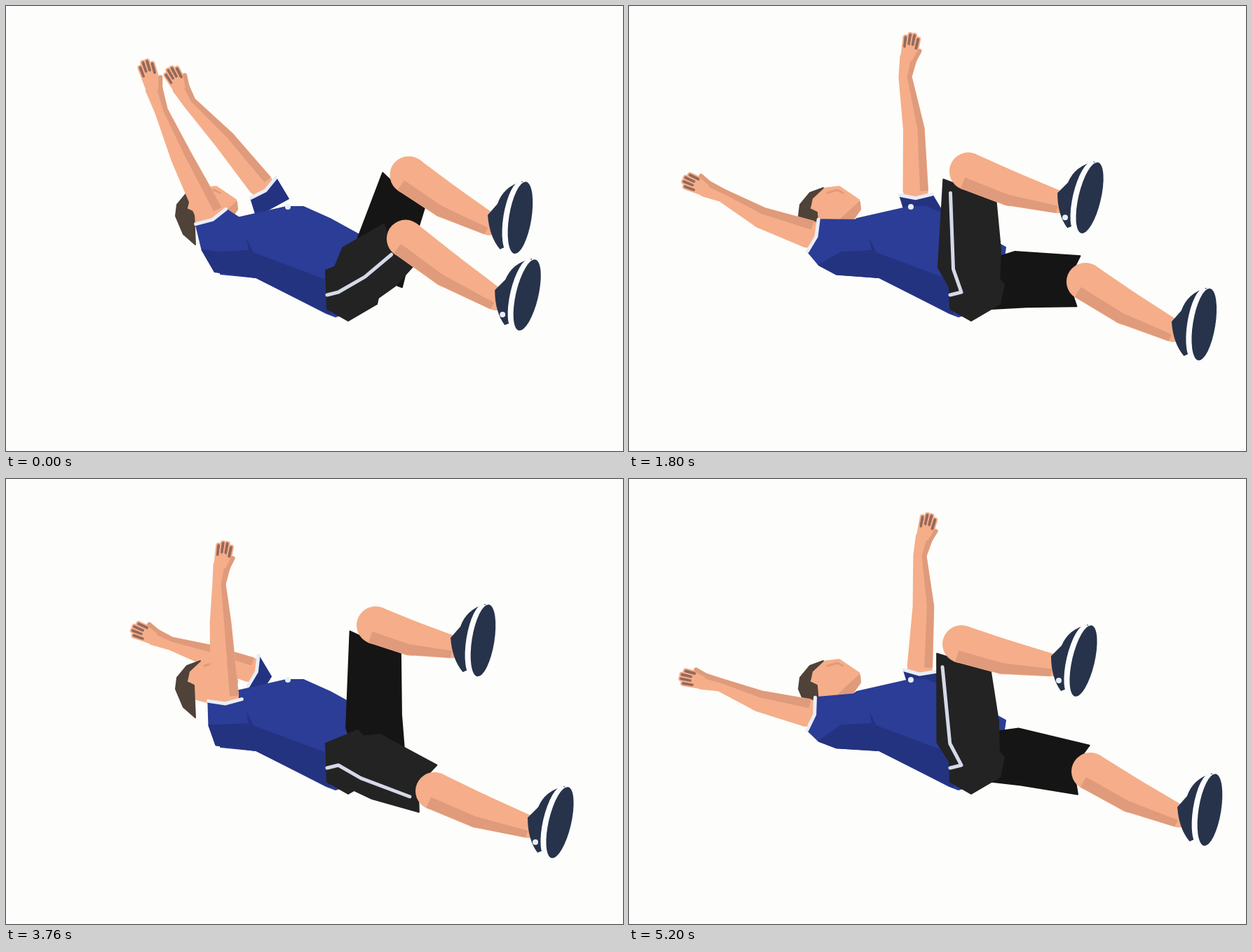
Recreate the animation shown at these times as an HTML page with a canvas. Size 880 px wide and 636 px high, loop 5.22 s.

```html
<!DOCTYPE html>
<html lang="en">
<head>
<meta charset="utf-8">
<title>Floor exercise</title>
<style>
html, body { margin: 0; width: 100%; height: 100%; overflow: hidden; background: #fdfdfb; }
canvas { display: block; width: 880px; height: 636px; }
</style>
</head>
<body>
<canvas id="stage" width="880" height="636"></canvas>
<script>
const ctx = document.getElementById('stage').getContext('2d');
const LOOP = 5220, CYCLE = 66, REACH = 46.75;
const PAPER = '#fdfdfb', SKIN = '#f5ae89', SKIN_SHADE = '#df9b7b', FINGER = '#94695c';
const SHIRT = '#2b3d96', SHIRT_DARK = '#243380', SHORTS = '#232323', FAR_SHORTS = '#151515';
const SHOE = '#27334a', TRIM = '#e9edf6', HAIR = '#4f4239';

const mix = (a, b, k) => a.map((v, i) => v + (b[i] - v) * k);
const add = ([x, y], dx, dy) => [x + dx, y + dy];

// Each joint swings along an arc: first pose, control point, last pose
const swing = (a, c, b) => p => mix(mix(a, c, p), mix(c, b, p), p);

const nearArm = [
  swing([254, 334], [273, 271], [312, 310]),
  swing([185, 317], [204, 204], [306, 205]),
  swing([130, 294], [153, 118], [304, 150]),
  swing([73, 282], [100, 17], [313, 90])];
const farArm = [
  swing([415, 268], [369, 234], [347, 272]),
  swing([420, 182], [318, 131], [285, 251]),
  swing([415, 110], [257, 40], [235, 235]),
  swing([429, 50], [246, -38], [180, 213])];
const nearLeg = [
  swing([474, 236], [547, 231], [611, 446]),
  swing([603, 266], [669, 369], [745, 497])];
const farLeg = [
  swing([658, 418], [607, 237], [527, 209]),
  swing([784, 482], [725, 351], [636, 240])];
const NEAR_HIP = [490, 400], FAR_HIP = [520, 385];

const TORSO = [[300, 322], [325, 304], [400, 287], [424, 287], [462, 304], [502, 326], [537, 345],
  [525, 425], [470, 444], [457, 439], [357, 388], [306, 383]];
const TORSO_SHADE = [[340, 328], [352, 353], [459, 393], [462, 440], [357, 388]];
const SEAT = [[456, 378], [502, 359], [535, 398], [529, 426], [488, 450], [458, 433]];
const FACE = [[256, 270], [275, 261], [300, 258], [328, 277], [330, 290], [318, 308],
  [306, 324], [268, 314]];
const JAW = [[329, 280], [330, 291], [306, 324], [288, 320], [305, 302]];
const HAIR_TOP = [[242, 300], [244, 284], [258, 267], [277, 260], [261, 275], [258, 290], [268, 295]];

function path(pts) {
  ctx.beginPath();
  pts.forEach(p => ctx.lineTo(p[0], p[1]));
}

function fill(pts, color) {
  path(pts);
  ctx.closePath();
  ctx.fillStyle = ctx.strokeStyle = color;
  ctx.lineWidth = 2;
  ctx.fill();
  ctx.stroke();
}

function line(pts, color, width) {
  path(pts);
  ctx.strokeStyle = color;
  ctx.lineWidth = width;
  ctx.stroke();
}

function oval(x, y, rx, ry, turn, color) {
  ctx.beginPath();
  ctx.ellipse(x, y, rx, ry, turn, 0, Math.PI * 2);
  ctx.fillStyle = color;
  ctx.fill();
}

const dot = (x, y, r, color) => oval(x, y, r, r, 0, color);

// Local axes of a bone: at(along, across) measured in pixels from its start
function bone(from, to) {
  const dx = to[0] - from[0], dy = to[1] - from[1], length = Math.hypot(dx, dy);
  const ux = dx / length, uy = dy / length;
  return { length, at: (s, w) => [from[0] + ux * s - uy * w, from[1] + uy * s + ux * w] };
}

function limb(joints, widths) {
  const last = joints.length - 1;
  const side = k => joints.map((p, i) => {
    const b = bone(joints[Math.max(i - 1, 0)], joints[Math.min(i + 1, last)]);
    const [x, y] = b.at(0, widths[i] * k), [ox, oy] = joints[Math.max(i - 1, 0)];
    return add(p, x - ox, y - oy);
  });
  joints.forEach((p, i) => dot(...p, widths[i], SKIN));
  fill([...side(-0.96), ...side(0.96).reverse()], SKIN);
  fill([...side(0.4), ...side(0.93).reverse()], SKIN_SHADE);
}

function arm(joints, upper) {
  const [shoulder, elbow, wrist, tip] = joints;
  const palm = mix(wrist, tip, 0.45);
  limb([shoulder, elbow, wrist, palm], [upper, 15, 9, 12]);
  const { at, length } = bone(palm, tip);
  for (let f = -1.5; f <= 1.5; f++) {
    const end = length * (1 - Math.abs(f) * 0.13);
    line([at(0, f * 5), at(end, f * 6)], SKIN, 8);
    line([at(end - 13, f * 5.5), at(end, f * 6)], FINGER, 4);
  }
  line([at(-3, 9), at(12, 14)], SKIN_SHADE, 6);
}

// The cuff sits square to the upper arm
function cuff(joints, half) {
  const { at } = bone(joints[0], joints[1]);
  return [at(-6, -half), at(-11, 0), at(-6, half)];
}

function thigh(hip, knee, halves, color) {
  const b = bone(hip, knee), hem = b.length - 10;
  const [top, under, seat] = halves;
  fill([b.at(0, -top * 0.7), b.at(28, -top), b.at(hem, -36), b.at(hem - 15, 0), b.at(hem, 36),
    b.at(50, under), b.at(0, seat)], color);
  return b;
}

function shin([knee, ankle]) {
  const b = bone(knee, ankle);
  limb([knee, b.at(b.length * 0.48, 4), ankle], [27, 25, 16]);
}

function shoe([x, y], turn) {
  ctx.save();
  ctx.translate(x, y);
  ctx.rotate(turn);
  ctx.beginPath();
  ctx.moveTo(52, -58);
  ctx.quadraticCurveTo(24, -52, 14, -28);
  ctx.lineTo(-1, -13);
  ctx.quadraticCurveTo(-1, 18, 13, 37);
  ctx.lineTo(32, 30);
  ctx.fillStyle = SHOE;
  ctx.fill();
  oval(37, -7, 16, 52, 0.23, '#fbfcfd');
  oval(45, -6, 16, 52, 0.23, SHOE);
  if (!turn) dot(10, 22, 4, TRIM);
  ctx.restore();
}

function draw(p) {
  const pose = joints => joints.map(j => j(p));
  const armN = pose(nearArm), armF = pose(farArm), legN = pose(nearLeg), legF = pose(farLeg);
  ctx.fillStyle = PAPER;
  ctx.fillRect(0, 0, 880, 636);

  arm(armF, 18);
  const far = cuff(armF, 23);
  fill([...far, add(far[2], 18, 30), add(far[0], 8, 26)], SHIRT_DARK);
  line(far, TRIM, 5);

  fill(TORSO, SHIRT);
  fill(TORSO_SHADE, SHIRT_DARK);
  dot(402, 287, 4, TRIM);

  fill(FACE, SKIN);
  fill(JAW, SKIN_SHADE);
  line([[283, 267], [297, 263], [305, 267]], SKIN_SHADE, 3);
  fill([...HAIR_TOP, [270, 317 + 24 * Math.min(1, 2 * p)], [253, 326]], HAIR);

  thigh(FAR_HIP, legF[0], [36, 42, 48], FAR_SHORTS);
  shin(legF);
  shoe(legF[1], -0.07);

  arm(armN, 20);
  const near = cuff(armN, 24);
  const fold = add(mix(near[0], [304, 385], 0.45), -6, 4);
  const low = add(mix(near[0], [304, 385], 0.9), -3, 2);
  fill([...near, [338, 306], [345, 350], [357, 388], low, fold], SHIRT);
  fill([[303, 352], [345, 350], [357, 388], low, fold], SHIRT_DARK);
  line(near, TRIM, 5);

  fill(SEAT, SHORTS);
  const leg = thigh(NEAR_HIP, legN[0], [48, 42, 38], SHORTS);
  const drift = 50 * p - 30;
  line([leg.at(leg.length - 30, drift), leg.at(25, drift), [474, 409], [458, 413]], '#d5d9e8', 5);
  shin(legN);
  shoe(legN[1], 0);
}

// Steps come in threes: two short, one long
function stepAt(t) {
  if (t < 120) return t < 20 ? 0 : 1;
  const u = t - 120, r = u % 140;
  return 2 + 3 * Math.floor(u / 140) + (r < 20 ? 0 : r < 40 ? 1 : 2);
}

// Swing from one pose to the other and back, resting at both ends
function progress(step) {
  const x = (step - REACH + CYCLE) % CYCLE;
  const u = Math.min(1, Math.max(0, (Math.min(x, CYCLE - x) - 3) / 27));
  return u * u * u * (10 - 15 * u + 6 * u * u);
}

ctx.lineJoin = ctx.lineCap = 'round';
const start = performance.now();
function tick() {
  draw(progress(stepAt((performance.now() - start) % LOOP)));
  requestAnimationFrame(tick);
}
tick();
</script>
</body>
</html>
```
